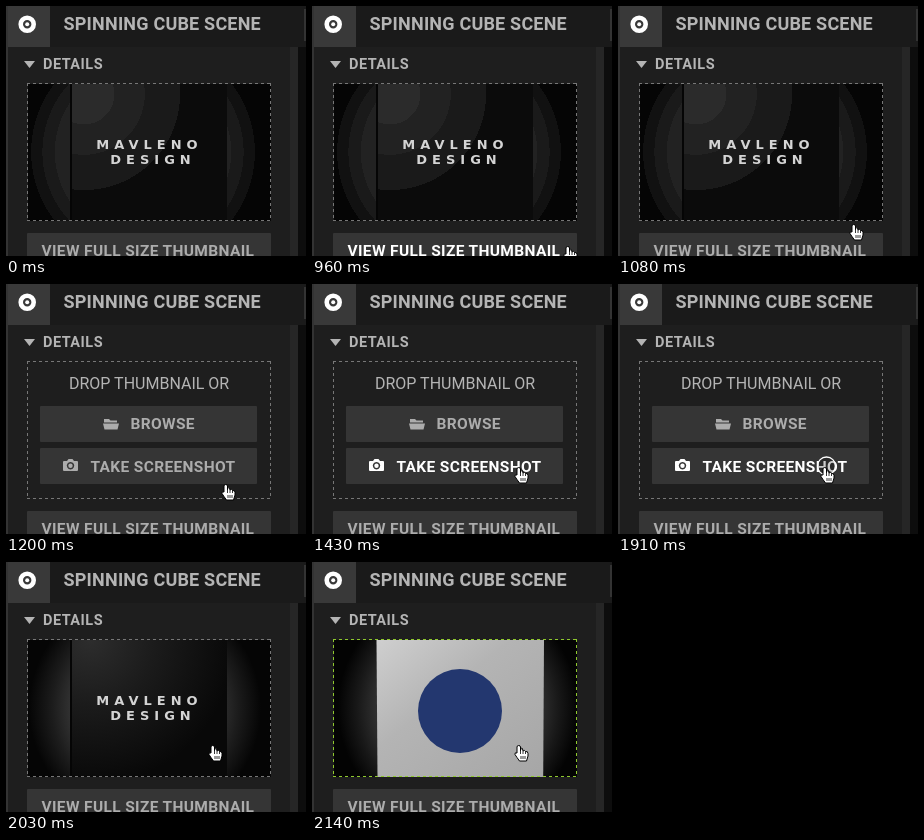
Recreate the animation shown at these times as an HTML page. Size 300 by 250 pixels, loop 2.98 s.

```html
<!DOCTYPE html>
<html lang="en">
<head>
<meta charset="utf-8">
<title>Scene details</title>
<style>
html, body { margin: 0; width: 100%; height: 100%; overflow: hidden; background: #1c1c1c; }
svg { display: block; width: 300px; height: 250px; }
text { font-family: Roboto, sans-serif; font-weight: 700; fill: #b4b4b4; }
.title { font-size: 18px; letter-spacing: .2px; }
.label { font-size: 14.5px; letter-spacing: .5px; }
.action { font-size: 15.5px; letter-spacing: .35px; fill: #acacac; }
.prompt { font-size: 16px; font-weight: 400; }
.wordmark { font: bold 13px "DejaVu Sans", sans-serif; text-anchor: middle; letter-spacing: 5px; fill: #d4d4d4; }
.icon { fill: #acacac; }

/* One 2980 ms loop; every state is held until the next step. */
.banded, .drop, .smooth, .render, .frame, .view, .shot, .pointer, .ring {
  animation: 2980ms step-end infinite;
}
.banded { animation-name: banded; }
.drop { animation-name: drop; }
.smooth { animation-name: smooth; }
.render { animation-name: render; }
.frame { animation-name: frame; }
.view { animation-name: view; }
.shot { animation-name: shot; }
.pointer { animation-name: pointer; }
.ring { animation-name: ring; }
@keyframes banded { 0% { visibility: visible } 40.268%, 100% { visibility: hidden } }
@keyframes drop { 0% { visibility: hidden } 40.268% { visibility: visible } 68.121%, 100% { visibility: hidden } }
@keyframes smooth { 0% { visibility: hidden } 68.121% { visibility: visible } 71.812%, 100% { visibility: hidden } }
@keyframes render { 0% { visibility: hidden } 71.812%, 100% { visibility: visible } }
@keyframes frame { 0% { stroke: #777 } 71.812%, 100% { stroke: #8fc92e } }
@keyframes view { 0% { fill: #acacac } 32.215% { fill: #fff } 36.242%, 100% { fill: #acacac } }
@keyframes shot { 0% { fill: #acacac } 43.96% { fill: #fff } 68.121%, 100% { fill: #acacac } }
@keyframes ring { 0% { visibility: hidden } 64.094% { visibility: visible } 68.121%, 100% { visibility: hidden } }
@keyframes pointer {
  0% { transform: translate(256px, 300px) }
  32.215% { transform: translate(256px, 240px) }
  36.242% { transform: translate(236px, 218px) }
  40.268% { transform: translate(220px, 200px) }
  43.96% { transform: translate(211px, 188px) }
  47.987%, 100% { transform: translate(207px, 183px) }
}
</style>
</head>
<body>
<svg viewBox="0 0 300 250">
  <defs>
    <radialGradient id="glow" gradientUnits="userSpaceOnUse" cx="139" cy="146" r="116">
      <stop offset=".62" stop-color="#343434"/><stop offset=".8" stop-color="#1c1c1c"/><stop offset="1" stop-color="#050505"/>
    </radialGradient>
    <radialGradient id="glowBands" gradientUnits="userSpaceOnUse" cx="137" cy="146" r="113">
      <stop offset=".78" stop-color="#222"/><stop offset=".78" stop-color="#1a1a1a"/>
      <stop offset=".89" stop-color="#1a1a1a"/><stop offset=".89" stop-color="#111"/>
      <stop offset=".99" stop-color="#111"/><stop offset=".99" stop-color="#050505"/>
    </radialGradient>
    <radialGradient id="face" gradientUnits="userSpaceOnUse" cx="84" cy="78" r="145">
      <stop stop-color="#2d2d2d"/><stop offset=".45" stop-color="#1b1b1b"/><stop offset="1" stop-color="#080808"/>
    </radialGradient>
    <radialGradient id="faceBands" gradientUnits="userSpaceOnUse" cx="78" cy="88" r="98">
      <stop offset=".31" stop-color="#2b2b2b"/><stop offset=".31" stop-color="#222"/>
      <stop offset=".62" stop-color="#222"/><stop offset=".62" stop-color="#1a1a1a"/>
      <stop offset=".98" stop-color="#1a1a1a"/><stop offset=".98" stop-color="#0b0b0b"/>
    </radialGradient>
    <radialGradient id="halo" gradientUnits="userSpaceOnUse" cx="146" cy="146" r="120">
      <stop offset=".65" stop-color="#343434"/><stop offset=".84" stop-color="#181818"/><stop offset="1" stop-color="#030303"/>
    </radialGradient>
    <linearGradient id="silver" x2="1" y2="1">
      <stop stop-color="#cfcfcf"/><stop offset=".4" stop-color="#b4b4b4"/><stop offset="1" stop-color="#a6a6a6"/>
    </linearGradient>
    <g id="wordmark">
      <text class="wordmark" x="143.5" y="143">MAVLENO</text>
      <text class="wordmark" x="147" y="157.5">DESIGN</text>
    </g>
  </defs>

  <rect width="300" height="250" fill="#1e1e1e"/>
  <rect x="2" width="298" height="41" fill="#1a1a1a"/>
  <rect x="2" width="42" height="41" fill="#393939"/>
  <rect width="2" height="250" fill="#333"/>
  <rect x="284" y="41" width="8" height="209" fill="#262626"/>
  <rect x="292" y="41" width="8" height="209" fill="#0d0d0d"/>
  <rect x="298" y="3" width="2" height="32" fill="#333"/>
  <circle cx="21.2" cy="18.2" r="6.5" fill="none" stroke="#fff" stroke-width="4.6"/>
  <circle cx="21.2" cy="18.2" r="2" fill="#fff"/>
  <text class="title" x="57.5" y="24">SPINNING CUBE SCENE</text>
  <path d="M18 55h11l-5.5 7z" fill="#b4b4b4"/>
  <text class="label" x="37" y="63">DETAILS</text>

  <g class="banded">
    <rect x="22" y="78" width="243" height="137" fill="url(#glowBands)"/>
    <rect x="65" y="78" width="156" height="137" fill="url(#faceBands)"/>
    <path d="M65 78v137" stroke="#050505" stroke-width="2"/>
    <use href="#wordmark"/>
  </g>

  <g class="drop">
    <text class="prompt" x="63" y="105">DROP THUMBNAIL OR</text>
    <rect x="34" y="122" width="217" height="36" rx="1" fill="#353535"/>
    <path class="icon" d="M98 135h5l1.5 1.5h6.5v2h-13zM97 139.5h16l-1.5 6h-13z"/>
    <text class="action" x="124.5" y="145">BROWSE</text>
    <rect x="34" y="164" width="217" height="36" rx="1" fill="#353535"/>
    <g class="shot">
      <path fill-rule="evenodd" d="M58 177h3l1.5-2h4l1.5 2h3q1 0 1 1v8q0 1-1 1h-13q-1 0-1-1v-8q0-1 1-1zM64.5 178a3.7 3.7 0 1 0 .01 0z"/>
      <circle cx="64.5" cy="181.7" r="2.2"/>
      <text class="action" x="84.5" y="188" style="fill:inherit">TAKE SCREENSHOT</text>
    </g>
  </g>

  <g class="smooth">
    <rect x="22" y="78" width="243" height="137" fill="url(#glow)"/>
    <rect x="65" y="78" width="156" height="137" fill="url(#face)"/>
    <path d="M65 78v137" stroke="#050505" stroke-width="2"/>
    <use href="#wordmark"/>
  </g>

  <g class="render">
    <rect x="22" y="78" width="243" height="137" fill="url(#halo)"/>
    <path d="M64.5 78H232l-.8 137H65.500z" fill="url(#silver)"/>
    <circle cx="148" cy="149" r="42" fill="#23376f"/>
  </g>

  <path class="frame" d="M21 77.5h244M21 214.5h244M21.5 77v138M264.5 77v138" fill="none" stroke-dasharray="3"/>
  <rect x="21" y="227" width="244" height="30" rx="1" fill="#353535"/>
  <text class="action view" x="35.5" y="250">VIEW FULL SIZE THUMBNAIL</text>

  <g class="pointer">
    <circle class="ring" cx="1.5" cy="-1" r="9" fill="#0003" stroke="#fff" stroke-width="1.3"/>
    <path d="M-2 8V2Q-2 .5-.3.5T1.500 2V5.500Q3-.0 4 6 5.500 4.500 6.500 6.500 9 6 9 8.500V11L7.500 16H.5L-2 12.500-4 9.500Q-4.500 7-2 8z"
      fill="#fff" stroke="#000" stroke-linejoin="round"/>
    <path d="M1.500 5v4M4 6v3M6.500 6.500V9M2 11v3m2-3v3m2-3v3" stroke="#000" stroke-width=".8"/>
  </g>
</svg>
</body>
</html>
```
